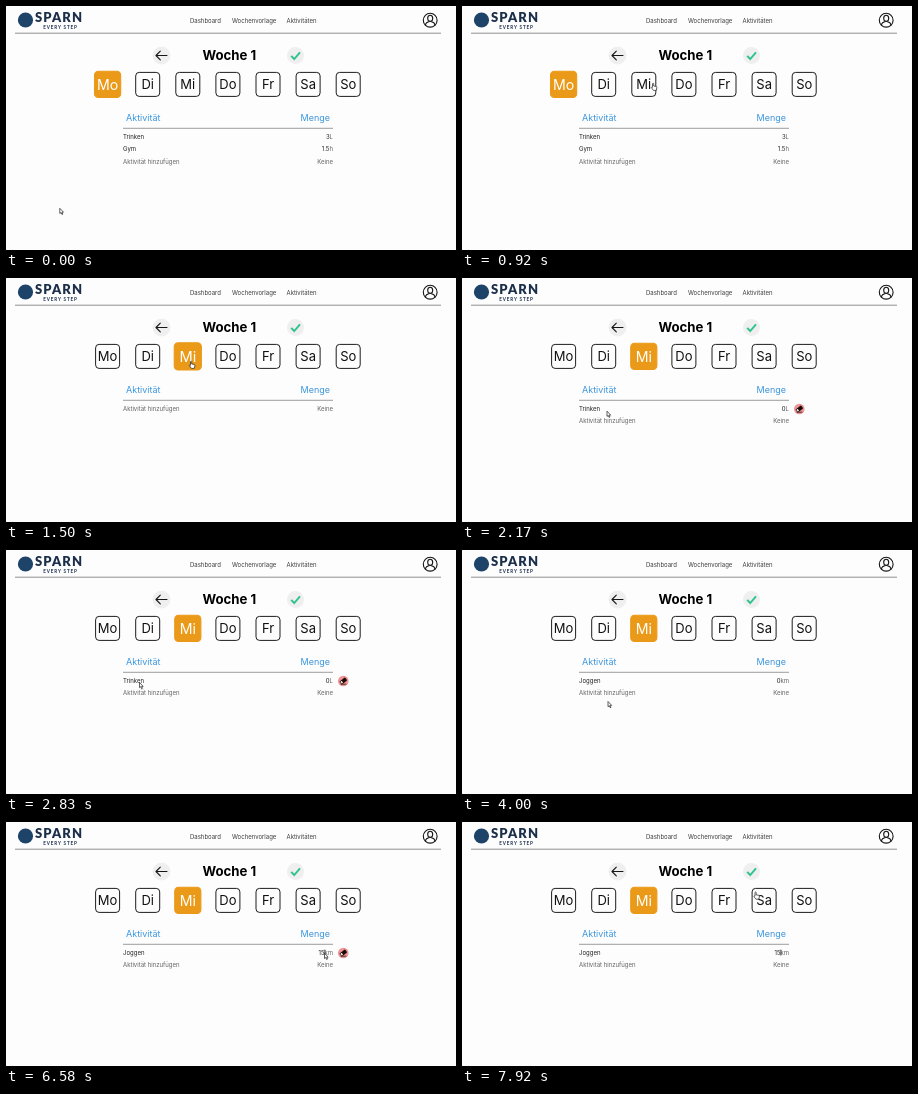
These frames come from a looping animation (450 by 244 pixels, 8000 ms). An HTML page:

```html
<!DOCTYPE html>
<html lang="de">
<head>
<meta charset="utf-8">
<title>Woche 1</title>
<style>
  html, body { margin: 0; width: 100%; height: 100%; overflow: hidden; background: #fefdfe; }
  svg { display: block; width: 450px; height: 244px; font-family: Inter, sans-serif; }
  .brand { font-family: Lato, sans-serif; fill: #1b2f4b; }
  .nav, .row { font-size: 6px; }
  .nav { fill: #3c3c3e; }
  .title { font-size: 13.2px; font-weight: 700; text-anchor: middle; }
  .head { font-size: 9px; fill: #3a95dc; }
  .row { fill: #222; }
  .add, .unit { fill: #636365; }
  .end { text-anchor: end; }
  .day rect { fill: #fefdfe; stroke: #1c1c1c; stroke-width: 1; }
  .day text { font-size: 13px; text-anchor: middle; fill: #111; }
  .day.on rect { fill: #ea9a18; stroke: #ea9a18; }
  .day.on text { fill: #fff; }
  .line { fill: none; stroke: #151515; stroke-width: 1.1; stroke-linecap: round; stroke-linejoin: round; }
  .pointer path { fill: #fff; stroke: #222; stroke-width: .7; stroke-linejoin: round; }
</style>
</head>
<body>
<svg viewBox="0 0 450 244">
  <circle cx="19.5" cy="14" r="7.6" fill="#1d4468"/>
  <text class="brand" x="29" y="16" font-size="13" font-weight="900" textLength="" letter-spacing="1.1">SPARN</text>
  <text class="brand" x="37.3" y="22.6" font-size="4.6" font-weight="700" letter-spacing=".85">EVERY STEP</text>
  <g class="nav">
    <text x="184" y="16.6">Dashboard</text>
    <text x="226" y="16.6">Wochenvorlage</text>
    <text x="280.5" y="16.6">Aktivitäten</text>
  </g>
  <g class="line" stroke-width="1">
    <circle cx="424.2" cy="14.2" r="6.9"/>
    <ellipse cx="424.2" cy="12.3" rx="2.5" ry="3.1"/>
    <path d="M419.4 19q.4-2.4 3.4-3.2M429 19q-.4-2.4-3.4-3.2"/>
  </g>
  <path d="M9 27.2H435" stroke="#777" stroke-width=".8"/>

  <circle cx="155.5" cy="49.5" r="9" fill="#efeff0"/>
  <path class="line" d="M161 49.5H150M154.3 45.2L150 49.5L154.3 53.8"/>
  <text class="title" x="223.3" y="54.2">Woche 1</text>
  <circle cx="289.5" cy="49.5" r="8.5" fill="#efeff0"/>
  <path d="M285.2 49.8L288.2 53L294 46.3" fill="none" stroke="#2fc38b" stroke-width="1.9"/>

  <g id="days"></g>

  <text class="head" x="120" y="115.4">Aktivität</text>
  <text class="head end" x="324" y="115.4">Menge</text>
  <path d="M117 122.3H327" stroke="#858585" stroke-width=".8"/>
  <g id="rows"></g>
  <path id="caret" d="M318.8 127.6V133.6" stroke="#111" stroke-width=".7"/>

  <g id="eraser">
    <circle r="5.3" fill="#ee9292"/>
    <g transform="rotate(-38)">
      <rect x="-3.6" y="-1.9" width="7.2" height="3.8" rx=".8" fill="#160c0c"/>
      <rect x="-3" y="-1.2" width="1.8" height="2.4" rx=".4" fill="#f6dada"/>
    </g>
    <path d="M-2.6 3.2H3" stroke="#160c0c" stroke-width=".7"/>
  </g>

  <g class="pointer">
    <path id="arrow" d="M0 0V5.2L1.2 4.2L2.1 6.2L3 5.8L2.1 3.9H3.7Z"/>
    <path id="hand" d="M1 .6Q1.6-.3 2.2.6V3L4.9 3.5Q5.6 3.8 5.4 4.7L4.8 7.4H1.9L-.1 4.6Q-.2 3.7 1 4.3Z"/>
  </g>
</svg>
<script>
const $ = id => document.getElementById(id);
const LOOP = 8000, FPS = 12, ROW_TOP = 125, ROW_H = 12.2;

// Pointer stops: tick, x, y
const stops = [
  [3, 53.8, 202.3], [11, 189.5, 77], [13, 183.5, 83], [18, 183.5, 83],
  [23, 145, 133.2], [26, 145, 133.2], [34, 133.5, 132.5], [40, 133.5, 132.5],
  [45, 135.5, 153.5], [47, 135.5, 153.5], [48, 146, 151.5], [57, 336.5, 131.3],
  [60, 318.5, 131.3], [91, 318.5, 131.3], [95, 292, 69.8]
];

const days = ['Mo', 'Di', 'Mi', 'Do', 'Fr', 'Sa', 'So'].map((name, i) => {
  $('days').insertAdjacentHTML('beforeend',
    `<g class="day"><rect x="-12" y="-12" width="24" height="24" rx="3.5"/><text y="4.8">${name}</text></g>`);
  return { node: $('days').lastChild, x: 101.6 + i * 40.1 };
});

const ease = p => p * p * (3 - 2 * p);
const ramp = (t, a, b) => ease(Math.min(1, Math.max(0, (t - a) / (b - a))));
const show = (node, on) => node.setAttribute('visibility', on ? 'visible' : 'hidden');

function pointerAt(t) {
  let i = 0;
  while (i < stops.length - 2 && t > stops[i + 1][0]) i++;
  const [a, ax, ay] = stops[i], [b, bx, by] = stops[i + 1];
  const p = ramp(t, a, b);
  return [ax + (bx - ax) * p, ay + (by - ay) * p];
}

function rowsAt(t) {
  if (t < 14) return [['Trinken', '3', 'L'], ['Gym', '1.5', 'h']];
  if (t < 26) return [];
  if (t < 48) return [['Trinken', '0', 'L']];
  return [['Joggen', t < 77 ? '0' : t < 78 ? '' : t < 79 ? '1' : '15', 'km']];
}

let shownRows = '';
function drawRows(rows) {
  const html = [...rows, ['Aktivität hinzufügen', '', 'Keine']].map(([name, amount, unit], i) => {
    const y = 133.1 + i * ROW_H, cls = i === rows.length ? 'row add' : 'row';
    return `<text class="${cls}" x="117" y="${y}">${name}</text>` +
      `<text class="${cls} end" x="327" y="${y}">${amount}<tspan class="unit">${unit}</tspan></text>`;
  }).join('');
  if (html !== shownRows) $('rows').innerHTML = shownRows = html;
}

function render(ms) {
  const t = Math.floor(ms % LOOP * FPS / 1000 + .05);
  const [x, y] = pointerAt(t);
  const rows = rowsAt(t);
  const selected = t < 14 ? 0 : 2;

  days.forEach(({ node, x: dx }, i) => {
    let scale = 1;
    if (i === 0) scale += .09 * (1 - ramp(t, 13, 16));
    if (i === 2) scale += .09 * ramp(t, 11, 15) + .04 * (ramp(t, 13, 16) - ramp(t, 18, 22));
    node.setAttribute('transform', `translate(${dx} 78.4) scale(${scale})`);
    node.setAttribute('class', i === selected ? 'day on' : 'day');
  });

  drawRows(rows);
  show($('caret'), t >= 65 && t < 72 || t >= 77 && t < 86 || t >= 92);

  // The open menu keeps its row hovered
  const menu = t >= 26 && t < 48;
  const over = menu ? 0 : Math.floor((y - ROW_TOP) / ROW_H);
  show($('eraser'), over >= 0 && over < rows.length && x > 115 && x < 343);
  $('eraser').setAttribute('transform', `translate(337.3 ${131 + over * ROW_H})`);

  const onDay = y > 66 && y < 91 && days.some(d => Math.abs(x + 1.5 - d.x) < 13);
  const hand = onDay || t === 23;
  for (const id of ['arrow', 'hand']) {
    $(id).setAttribute('transform', `translate(${x} ${y})`);
    show($(id), (id === 'hand') === hand);
  }
}

const start = performance.now();
function loop(now) {
  render(Math.max(0, now - start));
  requestAnimationFrame(loop);
}
render(0);
requestAnimationFrame(loop);
</script>
</body>
</html>
```
